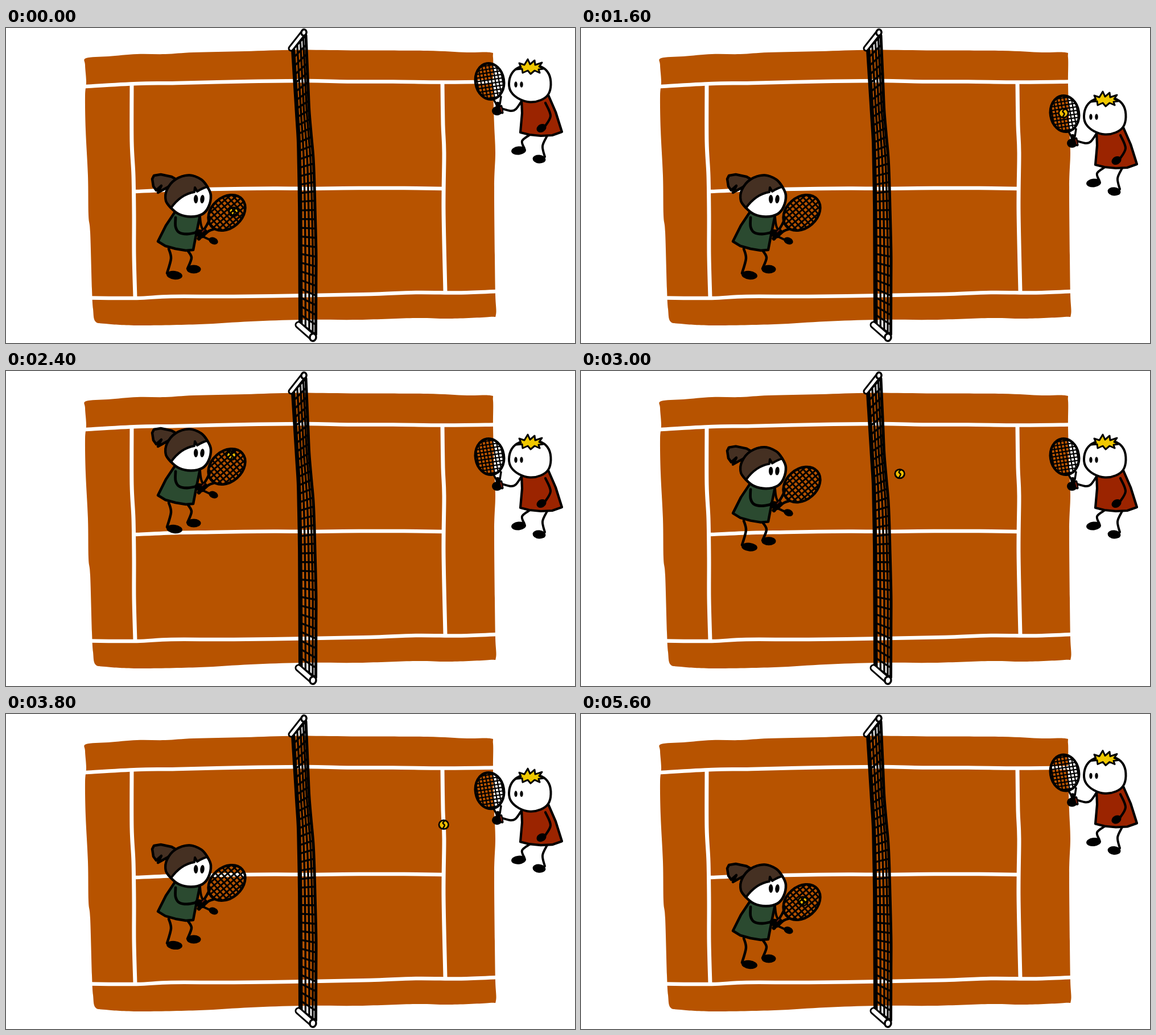
An HTML page with a canvas for the animation above (5800 ms loop, 1000 by 555 pixels).

```html
<!DOCTYPE html>
<html lang="en">
<head>
<meta charset="utf-8">
<title>Tennis rally</title>
<style>
html, body { margin: 0; width: 100%; height: 100%; overflow: hidden; background: #fff; }
canvas { display: block; width: 100%; height: 100%; }
</style>
</head>
<body>
<canvas id="stage" width="1000" height="555"></canvas>
<script>
const ctx = document.getElementById('stage').getContext('2d');
const LOOP = 5800, STEP = 200;
const CLAY = '#b75300', RED = '#9b2400', GREEN = '#2b4a30', HAIR = '#453022', BLOND = '#f0c800';

// Keys: [time, value, ...]
const BALL = [
  [0, 400, 324], [1000, 742, 202], [1600, 848, 150],
  [2400, 396, 149], [3690, 749, 218], [4200, 843, 111],
  [4800, 591, 270], [5200, 425, 402], [5600, 390, 330]
];
const BOY = [[0, 0], [1000, 0], [1200, 38], [1300, 57], [3700, 57], [4000, 9.5]];
const GIRL = [[0, 0], [1600, 0], [2000, -82], [2400, -157], [2740, -157], [4080, 6]];

function at(keys, t) {
  const i = keys.findIndex(k => k[0] > t);
  if (i < 0) return keys[keys.length - 1].slice(1);
  const a = keys[i - 1], b = keys[i], u = (t - a[0]) / (b[0] - a[0]);
  return a.slice(1).map((v, n) => v + (b[n + 1] - v) * u);
}

// Catmull-Rom curve through flat x, y pairs
function curve(xy, closed) {
  const n = xy.length / 2, path = new Path2D();
  const pt = i => {
    const k = closed ? (i + n) % n : Math.max(0, Math.min(n - 1, i));
    return [xy[2 * k], xy[2 * k + 1]];
  };
  path.moveTo(xy[0], xy[1]);
  for (let i = 0; i < (closed ? n : n - 1); i++) {
    const [a, b, c, d] = [pt(i - 1), pt(i), pt(i + 1), pt(i + 2)];
    path.bezierCurveTo(b[0] + (c[0] - a[0]) / 6, b[1] + (c[1] - a[1]) / 6,
      c[0] - (d[0] - b[0]) / 6, c[1] - (d[1] - b[1]) / 6, c[0], c[1]);
  }
  if (closed) path.closePath();
  return path;
}

function poly(xy) {
  const path = new Path2D();
  for (let i = 0; i < xy.length; i += 2) path.lineTo(xy[i], xy[i + 1]);
  path.closePath();
  return path;
}

function oval(x, y, rx, ry, turn = 0) {
  const path = new Path2D();
  path.ellipse(x, y, rx, ry, turn, 0, Math.PI * 2);
  return path;
}

function paint(path, fill, width, color = '#000') {
  if (fill) { ctx.fillStyle = fill; ctx.fill(path); }
  if (width) { ctx.strokeStyle = color; ctx.lineWidth = width; ctx.stroke(path); }
}

const line = (xy, width, color) => paint(curve(xy), null, width, color);
const blob = (...o) => paint(oval(...o), '#000');

function drawCourt() {
  paint(curve([141, 53, 180, 50, 230, 46, 280, 46, 330, 43, 420, 41, 510, 38.5, 620, 39.5, 740, 40,
    810, 43, 851, 43, 856, 52, 856, 100, 858, 170, 860, 220, 858, 280, 859, 400, 860, 470,
    861, 505, 850, 509, 780, 512, 720, 511, 620, 514, 520, 514, 430, 517, 340, 522, 230, 524,
    175, 521, 157, 517, 153, 495, 151, 460, 148, 360, 145, 330, 144, 260, 140, 180,
    139, 120, 141, 95, 139, 65], true), CLAY);
  ctx.lineCap = 'butt';
  line([138, 103, 230, 98, 300, 97, 430, 94, 530, 93, 600, 94.5, 680, 94.5, 768, 95.5, 860, 94.5], 6.5, '#fff');
  line([221, 101, 221, 200, 224, 260, 225, 330, 225, 400, 227, 475], 7, '#fff');
  line([228, 288, 300, 285, 360, 284, 470, 282.5, 540, 283, 620, 282, 700, 282, 768, 283], 6.5, '#fff');
  line([767, 97, 768, 170, 770, 220, 769, 320, 772, 464], 7, '#fff');
  line([149, 475.5, 230, 476, 290, 473, 400, 473, 540, 471, 640, 469, 720, 466, 800, 466.5, 862, 464], 6.5, '#fff');
  ctx.lineCap = 'round';
}

const NET_LEFT = [[0, 504, 38], [0.34, 514, 200], [0.55, 516, 300], [1, 517, 520]];
const NET_RIGHT = [[0, 527, 13], [0.26, 533, 150], [0.44, 541, 240], [0.73, 545, 392], [1, 544.5, 540]];

function netPoint(side, v) {
  const a = at(NET_LEFT, v), b = at(NET_RIGHT, v);
  return [a[0] + (b[0] - a[0]) * side, a[1] + (b[1] - a[1]) * side];
}

function drawNet() {
  const strand = (side, width) => {
    const xy = [];
    for (let i = 0; i <= 12; i++) xy.push(...netPoint(side, i / 12));
    line(xy, width);
  };
  strand(0, 6);
  strand(0.1, 3.5);
  [0.34, 0.58, 0.8].forEach(s => strand(s, 3.4));
  strand(1, 5);
  for (let i = 0; i <= 32; i++) line([...netPoint(0, i / 32), ...netPoint(1, i / 32)], 3.4);
  drawPost(501, 36, 523, 8, 5);
  drawPost(514, 523, 539, 545, 6);
}

function drawPost(x1, y1, x2, y2, r) {
  line([x1, y1, x2, y2], 2 * r + 1);
  line([x1, y1, x2, y2], 2 * r - 5, '#fff');
  paint(oval(x2 + 0.5, y2, r - 0.5, r + 0.5, 0.2), '#fff', 3.5);
}

function drawRacket(x, y, rx, ry, turn, gap, string) {
  const rim = oval(0, 0, rx, ry);
  ctx.save();
  ctx.translate(x, y);
  ctx.rotate(turn);
  ctx.save();
  ctx.clip(rim);
  for (let d = -5.5 * gap; d < 40; d += gap) {
    line([d, -40, d + 1, 40], string);
    line([-40, d, 40, d + 1], string);
  }
  ctx.restore();
  paint(rim, null, 4.5);
  ctx.restore();
}

function drawBoy() {
  line([921, 188, 907, 199, 911, 212], 4);
  blob(901, 216, 13, 7.5, -0.1);
  line([951, 190, 943, 208, 947, 227], 4);
  blob(937, 231, 11.5, 7.5, 0.1);
  line([906, 129, 896, 143, 887, 146, 871, 142], 4);
  paint(poly([906, 126, 907, 150, 904, 184, 920, 188, 940, 190, 960, 189, 977, 183, 966, 148, 953, 118]), RED, 4.2);
  paint(curve([884, 98, 889, 80, 902, 69, 922, 65, 942, 69, 954, 81, 957.5, 100, 953, 117, 940, 127,
    921, 130.5, 902, 125, 888, 113], true), '#fff', 4);
  paint(poly([897, 73, 905, 69, 902, 62, 911, 65, 917, 55, 921, 64, 929, 57, 930, 65, 942, 61, 937, 68,
    944, 72, 936, 73, 938, 79, 929, 75, 922, 81, 917, 75, 908, 79, 907, 72]), BLOND, 3);
  blob(896, 99.5, 2.7, 5.3);
  blob(906, 99.5, 2.7, 5.3);
  line([948, 132, 957, 155, 946, 175], 4.2);
  blob(941, 176.5, 9, 7, -0.5);

  paint(poly([857, 124, 871, 121, 868, 134, 862, 135]), '#fff');
  line([856, 124, 862, 135], 3.5);
  line([870, 121, 868, 134], 3.5);
  drawRacket(850, 94, 25, 32, -0.16, 6.3, 2.2);
  line([864, 134, 867, 148], 8);
  blob(863, 146, 9, 8);
  line([870, 138, 872, 149], 5);
  line([869.5, 140, 871.5, 147], 2.2, '#6d1c0c');
}

function drawGirl() {
  line([286, 389, 290, 406, 283, 432], 4.5);
  blob(296, 435.5, 14, 7.5, 0.12);
  line([320, 393, 326, 405, 319, 424], 4.5);
  blob(330, 425, 12.5, 7.5);
  line([341, 333, 343, 348, 349, 362], 4);
  paint(poly([297, 324, 281, 348, 267, 376, 280, 384, 298, 389, 316, 392, 329, 391, 333, 370, 341, 330]), GREEN, 4.5);
  paint(poly([303, 269, 291, 262, 272, 258, 260, 260, 257, 266, 259, 279, 264, 286, 273, 278, 267, 290, 285, 280]), HAIR, 4.5);
  paint(curve([290, 317, 281, 304, 283, 285, 298, 267, 322, 259.5, 343, 267, 354, 280, 360, 295,
    356, 315, 345, 328, 325, 332.5, 304, 328], true), '#fff', 4.5);
  const hair = curve([290, 317, 281, 304, 283, 285, 298, 267, 322, 259.5, 343, 267, 354, 280]);
  hair.quadraticCurveTo(347, 281, 336, 288);
  hair.lineTo(332, 281);
  hair.lineTo(331, 289);
  hair.quadraticCurveTo(307, 293, 290, 317);
  paint(hair, HAIR, 4);
  blob(333.7, 301.5, 3.7, 7.5);
  blob(345, 301.5, 3.7, 7.5, 0.1);
  line([298, 334, 298, 350, 304, 360, 318, 363, 336, 360], 4.8);

  line([358, 337, 353, 347, 344, 362], 4.5);
  line([367, 354, 356, 358, 345, 368], 4.5);
  drawRacket(388, 325.5, 36, 27, -0.72, 7.8, 2.9);
  blob(341, 362, 10, 7, 0.3);
  line([350, 358, 339, 371], 7);
  line([348, 356, 345, 359], 2, '#5e190c');
  line([345, 367, 360, 374], 4);
  blob(364.5, 375, 8.5, 6, 0.4);
}

function drawBall([x, y]) {
  ctx.save();
  ctx.translate(x, y);
  paint(oval(0, 0, 8.3, 7.8), '#f0bd00', 2.8);
  line([2, -7, -1.5, -3, 1.5, 1, -1, 6], 2.5);
  ctx.restore();
}

function shifted(draw, dy) {
  ctx.save();
  ctx.translate(0, dy);
  draw();
  ctx.restore();
}

function frame(now) {
  const t = Math.floor(now % LOOP / STEP) * STEP;
  ctx.fillStyle = '#fff';
  ctx.fillRect(0, 0, 1000, 555);
  ctx.lineJoin = 'round';
  drawCourt();
  drawNet();
  shifted(drawBoy, at(BOY, t)[0]);
  drawBall(at(BALL, t));
  shifted(drawGirl, at(GIRL, t)[0]);
  requestAnimationFrame(frame);
}
frame(0);
</script>
</body>
</html>
```
